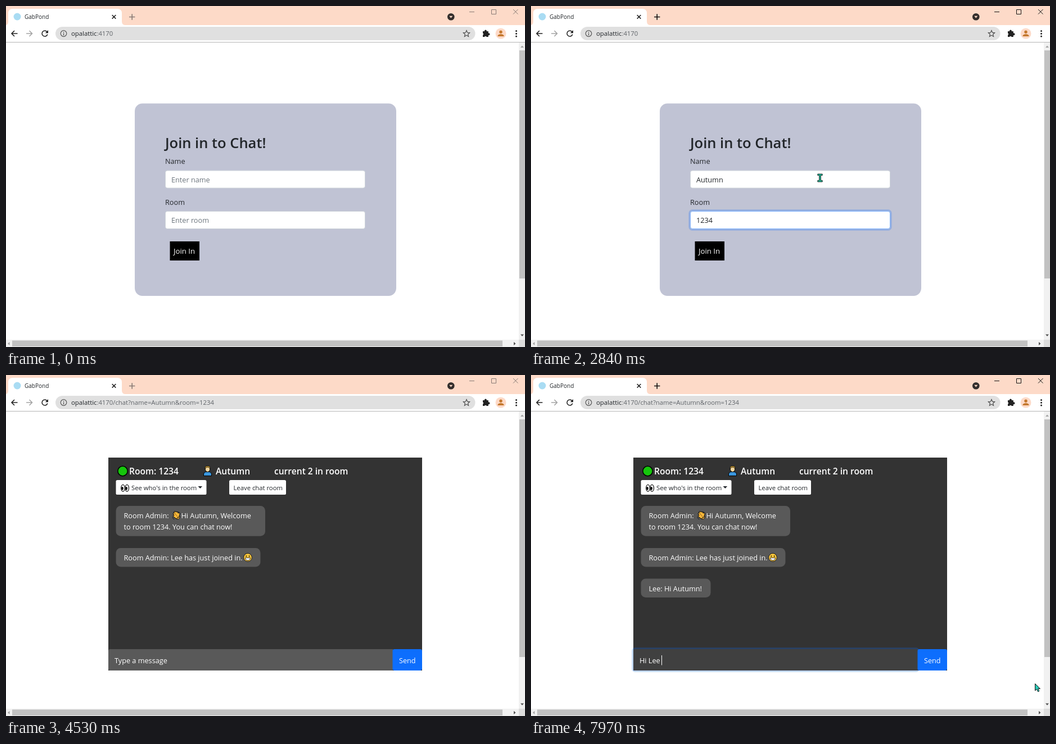
Write an HTML page that moves like this. It is 923 by 607 pixels and loops after 8000 ms.

```html
<!DOCTYPE html>
<html lang="en">
<head>
<meta charset="utf-8">
<title>Chat demo</title>
<style>
  html, body { margin: 0; width: 100%; height: 100%; overflow: hidden; background: #fff; }
  svg { display: block; width: 923px; height: 607px; }
  text { font: 12.7px "Open Sans", "Noto Sans", sans-serif; fill: #212529; white-space: pre; }
  .tab { font-size: 10px; }
  .url { font-size: 11.3px; }
  .url tspan { fill: #5f6368; }
  .title { font-size: 25.5px; font-weight: 600; }
  .head { font-size: 15.6px; font-weight: 600; }
  .small { font-size: 11.3px; }
  .light text, .white { fill: #fff; }
  .light .small { fill: #212529; }
  .hint { fill: #6c757d; }
  .line { fill: none; stroke: #222; stroke-width: 1.6; }
  .bubble { fill: #595959; }
</style>
</head>
<body>
<svg viewBox="0 0 923 607">
  <!-- browser frame -->
  <rect width="923" height="34" fill="#fddac8"/>
  <path d="M0 34Q4 33 4 27V13Q4 5 12 5H198Q206 5 206 13V27Q206 33 211 34Z" fill="#fff"/>
  <circle cx="20" cy="19" r="6.5" fill="#a9dcf3"/>
  <text class="tab" x="33" y="22.7">GabPond</text>
  <path class="line" d="M188.7 16l6.6 6.6m0-6.6l-6.6 6.6"/>
  <g id="frame">
    <path d="M219 19.5h10.4M224.2 14.3v10.4" fill="none" stroke-width="1.6"/>
    <path d="M824 10.5h9M863.5 6.500h8v8h-8zM902 6l8.500 8.500m0-8.500l-8.500 8.500" fill="none"/>
  </g>
  <circle cx="791.3" cy="19.3" r="6.3" fill="#332e2c"/>
  <path d="M788.3 17.800h6l-3 3.600z" fill="#fddac8"/>

  <path class="line" d="M20.500 49H10m5-5l-5 5 5 5"/>
  <path class="line" d="M36 49h10.500m-5-5l5 5-5 5" style="stroke:#a4a4a4"/>
  <path class="line" d="M73 46A5 5 0 1 0 73.800 50.500"/>
  <path d="M75 43v5.200h-5.200z" fill="#222"/>
  <rect x="88" y="37" width="746.500" height="24" rx="12" fill="#e0e0e0"/>
  <circle class="line" cx="102.500" cy="49" r="5.300" style="stroke:#555;stroke-width:1.2"/>
  <path d="M102.500 46v1.400m0 1.200v3.600" stroke="#555" stroke-width="1.300"/>
  <text class="url" x="116" y="53">opalattic<tspan>:4170</tspan><tspan id="path"></tspan></text>
  <path class="line" style="stroke:#444;stroke-width:1.1" d="M819 43.500l1.600 3.800 4.100.300-3.100 2.700 1 4-3.600-2.200-3.600 2.200 1-4-3.100-2.700 4.100-.300z"/>
  <path d="M848 45h3a2 2 0 1 1 3.800 0h3v3.300a2 2 0 1 1 0 3.700v3h-3.200a2 2 0 0 0-3.600 0h-3v-3.200a2 2 0 0 0 0-3.600z" fill="#222"/>
  <circle cx="880" cy="49" r="9.500" fill="#fddac8"/>
  <circle cx="880" cy="46.300" r="2.700" fill="#c4782d"/>
  <path d="M874.500 54v-1.300q1.500-2.700 5.500-2.700t5.500 2.700V54z" fill="#c4782d"/>
  <g fill="#222"><circle cx="907.500" cy="44.500" r="1.500"/><circle cx="907.500" cy="49.300" r="1.500"/><circle cx="907.500" cy="54" r="1.500"/></g>
  <path d="M0 64.500h923" stroke="#b4b4b4"/>

  <!-- scroll bars -->
  <path d="M912 65h11v529H912zM0 594h912v13H0z" fill="#f1f1f1"/>
  <path d="M912 594h11v13h-11z" fill="#dcdcdc"/>
  <rect id="thumb" x="913" y="79" width="10" fill="#c1c1c1"/>
  <rect x="11" y="595.500" width="872" height="10.500" fill="#c1c1c1"/>
  <path d="M915 74l3-3.500 3 3.500zM6.500 598v6l-3.500-3z" fill="#a3a3a3"/>
  <path d="M915 584.500l3 3.500 3-3.500zM903 598v6l3.500-3z" fill="#505050"/>

  <!-- join form -->
  <g id="join">
    <rect x="229" y="173.500" width="465" height="342.500" rx="13.500" fill="#c0c3d4"/>
    <text class="title" x="283" y="253">Join in to Chat!</text>
    <text x="283" y="281">Name</text>
    <text x="283" y="353.500">Room</text>
    <g id="name">
      <rect x="283.500" y="293" width="355" height="31" rx="3.400" fill="#fff" stroke="#ced4da"/>
      <g class="ring">
        <rect x="281.700" y="291.200" width="358.600" height="34.600" rx="5" fill="none" stroke="#0d6efd" stroke-opacity=".25" stroke-width="2.700"/>
        <rect x="283.500" y="293" width="355" height="31" rx="3.400" fill="none" stroke="#86b7fe"/>
      </g>
      <text x="294" y="313.700"></text>
      <path class="caret" d="M0 300.500v16" stroke="#212529"/>
    </g>
    <g id="room">
      <rect x="283.500" y="365.500" width="355" height="31" rx="3.400" fill="#fff" stroke="#ced4da"/>
      <g class="ring">
        <rect x="281.700" y="363.700" width="358.600" height="34.600" rx="5" fill="none" stroke="#0d6efd" stroke-opacity=".25" stroke-width="2.700"/>
        <rect x="283.500" y="365.500" width="355" height="31" rx="3.400" fill="none" stroke="#86b7fe"/>
      </g>
      <text x="294" y="386.200"></text>
      <path class="caret" d="M0 373v16.500" stroke="#212529"/>
    </g>
    <path d="M291.500 419h52.500v34h-52.500z"/>
    <text class="white" x="298" y="441" style="font-size:13.2px">Join In</text>
  </g>

  <!-- chat room -->
  <g id="chat" class="light">
    <path d="M182 147h558v379H182z" fill="#333"/>
    <circle cx="207.500" cy="171" r="8.700" fill="#16c60c" stroke="#000" stroke-width="1.500"/>
    <text class="head" x="219" y="177">Room: 1234</text>
    <g stroke="#000">
      <path d="M351.500 179.500v-2.500q0-4.500 5-4.500h4q5 0 5 4.500v2.500z" fill="#3a96dd"/>
      <ellipse cx="358.500" cy="167.500" rx="4.200" ry="5" fill="#f5d7a0"/>
      <path d="M354 167q-.5-5 4.500-5t4.500 5q-2-3-4.500-3t-4.500 3z" fill="#e8b33a" stroke-width=".8"/>
    </g>
    <text class="head" x="373" y="177">Autumn</text>
    <text class="head" id="count" x="477" y="177"></text>
    <rect x="195.500" y="187" width="161" height="26" rx="2.600" fill="#fff"/>
    <g fill="#fff" stroke="#111" stroke-width="1.300">
      <ellipse cx="208" cy="201.300" rx="3.300" ry="6"/><ellipse cx="215.200" cy="201.300" rx="3.300" ry="6"/>
    </g>
    <ellipse cx="207" cy="202" rx="1.700" ry="2.900"/><ellipse cx="214.200" cy="202" rx="1.700" ry="2.900"/>
    <text class="small" x="223" y="205">See who's in the room</text>
    <path d="M341.500 198h7.600l-3.800 4z" fill="#212529"/>
    <rect x="397" y="187" width="101" height="26" rx="2.600" fill="#fff"/>
    <text class="small" x="404.500" y="205">Leave chat room</text>

    <rect class="bubble" x="195.500" y="233" width="265.500" height="53.700" rx="8.500"/>
    <text x="209.500" y="255">Room Admin:</text>
    <g id="wave" fill="none" stroke-linecap="round">
      <path id="hand" d="M304 253l-5-6M305 250l-4.500-5.500M306.500 249l-3-4M303 254l-4-3M306 252l1.500-5" stroke="#1b1b1b" stroke-width="4.200"/>
      <circle cx="305" cy="252.500" r="4.200" fill="#ffb938" stroke="#1b1b1b"/>
      <use href="#hand" style="stroke:#ffb938"/>
      <path d="M304 253l-5-6M305 250l-4.500-5.500M306.500 249l-3-4M303 254l-4-3M306 252l1.500-5" stroke="#ffb938" stroke-width="2.200"/>
      <path d="M296 253q.5 3 3 4M305 243.500q3 0 4 2" stroke="#1b1b1b"/>
    </g>
    <text x="311.500" y="255">Hi Autumn, Welcome</text>
    <text x="209.500" y="275">to room 1234. You can chat now!</text>
    <g id="joined">
      <rect class="bubble" x="195.500" y="308" width="257" height="33.500" rx="8.500"/>
      <text x="209.500" y="329.700">Room Admin: Lee has just joined in.</text>
      <circle cx="430" cy="324.800" r="7.300" fill="#ffc83d" stroke="#1b1b1b"/>
      <circle cx="427.300" cy="322.500" r="1.100"/><circle cx="432.700" cy="322.500" r="1.100"/>
      <path d="M425.500 325.500h9q-.5 4.500-4.500 4.500t-4.500-4.500z" fill="#fff" stroke="#1b1b1b" stroke-width=".9"/>
    </g>
    <g id="hello">
      <rect class="bubble" x="195.500" y="362.500" width="124" height="33.500" rx="8.500"/>
      <text x="209.500" y="384.500">Lee: Hi Autumn!</text>
    </g>
    <g id="msg">
      <path id="field" d="M185 488h503v38H185q-3 0-3-3v-32q0-3 3-3z"/>
      <g class="ring">
        <rect x="180.700" y="486.700" width="508.600" height="40.600" rx="4" fill="none" stroke="#0d6efd" stroke-opacity=".25" stroke-width="2.700"/>
      </g>
      <text x="193" y="512.700"></text>
      <path class="caret" d="M0 499v17.500" stroke="#fff"/>
    </g>
    <rect x="687.500" y="488" width="52.500" height="38" rx="3.400" fill="#0d6efd"/>
    <text x="699" y="512.700">Send</text>
  </g>

  <g id="cursor">
    <circle id="press" r="10" fill="#e6d705" fill-opacity=".55"/>
    <path id="arrow" d="M.5 0V12.300L3.500 9.800 5.600 14.200 7.800 13.200 5.800 8.900H9.500Z" fill="#2ac9b6" stroke="#111"/>
    <path id="beam" d="M-4.200-7h8.400v2.600h-2.800v8.800h2.800V7h-8.400V4.400h2.800v-8.800h-2.800z" fill="#17b391" stroke="#222" stroke-width=".9"/>
  </g>
</svg>
<script>
const LOOP = 8000, TICK = 80;
const $ = id => document.getElementById(id);
const within = (t, spans) => spans.some(([a, b]) => t >= a && t < b);
const show = (el, on) => { el.style.display = on ? '' : 'none'; };

const CHAT_AT = 3620;
const active = [[390, 3850], [6860, LOOP]];
const visible = [[70, 3850], [6860, LOOP]];
const presses = [[470, 550], [3390, 3540], [6940, 7020]];

// start, ticks, from, to
const moves = [
  [70, 5, [570, 610], [514, 306]],
  [3010, 6, [514, 306], [325, 426.5]],
  [6860, 1, [638, 502], [638, 502]],
  [7020, 4, [638, 502], [896, 549.5]]
];

const fields = [
  { id: 'name', hint: 'Enter name', word: 'Autumn', focus: [470, 1800],
    keys: [800, 1020, 1190, 1340, 1420, 1570], caret: [[470, 1800]] },
  { id: 'room', hint: 'Enter room', word: '1234', focus: [1800, LOOP],
    keys: [2100, 2200, 2310, 2540], caret: [[1800, 2540], [2620, 2840]] },
  { id: 'msg', hint: 'Type a message', word: 'Hi Lee ', focus: [6940, LOOP + 200],
    keys: [7100, 7100, 7180, 7180, 7260, 7260, 7970], caret: [[6940, 7790], [7970, LOOP]] }
];
for (const f of fields) {
  const g = $(f.id);
  f.ring = g.querySelector('.ring');
  f.text = g.querySelector('text');
  f.caretEl = g.querySelector('.caret');
  f.x = +f.text.getAttribute('x');
}

function fade(t, from) {
  const p = Math.min(1, Math.max(0, (t - from) / 150));
  return p * p * (3 - 2 * p);
}

function drawField(f, t) {
  const count = f.keys.filter(k => k <= t).length;
  f.text.textContent = count ? f.word.slice(0, count) : f.hint;
  f.text.setAttribute('class', count ? '' : f.id === 'msg' ? 'white' : 'hint');
  f.ring.style.opacity = fade(t, f.focus[0]) - fade(t, f.focus[1]);
  const on = within(t, f.caret);
  show(f.caretEl, on);
  if (on) {
    const end = f.x + (count ? f.text.getComputedTextLength() : 0);
    f.caretEl.setAttribute('transform', `translate(${Math.floor(end) + 0.5})`);
  }
}

function pointerAt(t) {
  const [start, ticks, a, b] = moves.filter(m => m[0] <= t).pop() || moves[0];
  const p = Math.max(0, Math.min(1, (Math.floor((t - start) / TICK) + 1) / ticks));
  const e = p * (2 - p);
  return a.map((v, i) => v + (b[i] - v) * e);
}

function overInput(x, y, chat) {
  if (chat) return x > 182 && x < 688 && y > 488 && y < 526;
  return x > 283 && x < 639 && (y > 293 && y < 324 || y > 365 && y < 397);
}

function draw(t) {
  const chat = t >= CHAT_AT;
  show($('join'), !chat);
  show($('chat'), chat);
  $('thumb').setAttribute('height', chat ? 423 : 406);
  $('frame').setAttribute('stroke', within(t, active) ? '#111' : '#877a74');
  $('path').textContent = t >= 3540 ? '/chat?name=Autumn&room=1234' : '';

  $('count').textContent = `current ${t < 4530 ? 1 : 2} in room`;
  show($('joined'), t >= 4530);
  show($('hello'), t >= 5610);
  $('field').setAttribute('fill', t >= 6940 ? '#404040' : '#595959');
  for (const f of fields) if ((f.id === 'msg') === chat) drawField(f, t);

  const [x, y] = pointerAt(t), beam = overInput(x, y, chat);
  show($('cursor'), within(t, visible));
  $('cursor').setAttribute('transform', `translate(${x} ${y})`);
  show($('press'), within(t, presses));
  show($('beam'), beam);
  show($('arrow'), !beam);
}

const began = performance.now();
function tick() {
  draw((performance.now() - began) % LOOP);
  requestAnimationFrame(tick);
}
tick();
</script>
</body>
</html>
```
